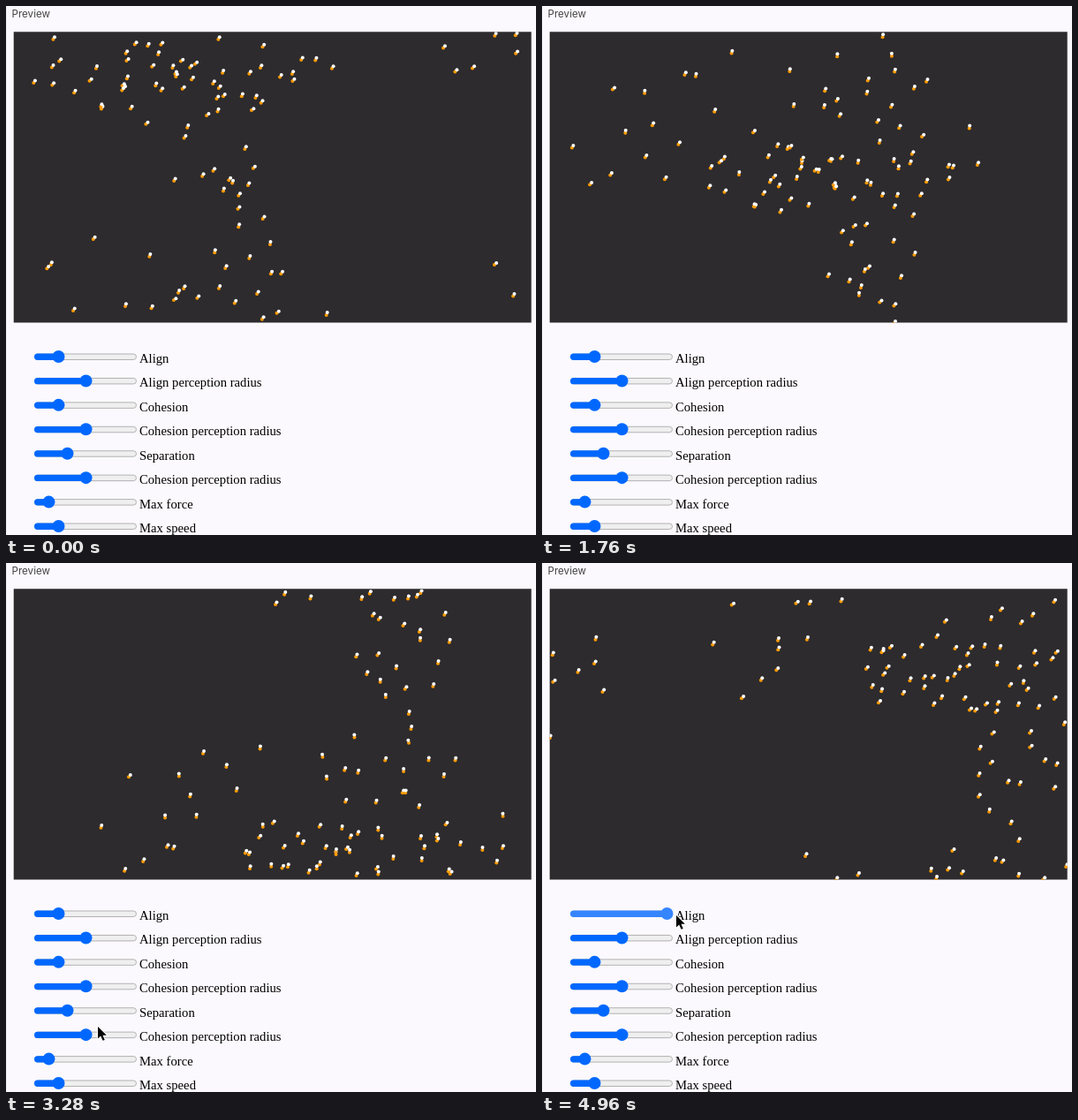
Write an HTML page with a canvas that moves like this. It is 600x599 px and loops after 5 s.

```html
<!DOCTYPE html>
<html lang="en">
<head>
<meta charset="utf-8">
<title>Flocking preview</title>
<style>
  html, body { margin: 0; width: 100%; height: 100%; overflow: hidden; background: #fbf9fd; }
  svg, canvas { position: absolute; left: 0; top: 0; }
  .title { font: 11.6px Inter, sans-serif; fill: #444; }
  .label { font: 14.68px "Liberation Serif", serif; fill: #000; }
</style>
</head>
<body>
<svg id="text" width="600" height="599">
  <rect width="1" height="599" fill="#eeecf0"/>
  <text class="title" x="6.5" y="13">Preview</text>
</svg>
<canvas id="stage" width="600" height="599"></canvas>
<script>
const LOOP = 5000, STEP = 40;
const FIELD = { x: 8.7, y: 29.2, w: 586, h: 329.2 };
const ctx = document.getElementById('stage').getContext('2d');

// Label and thumb position of each slider
const sliders = [
  ['Align', 59.5], ['Align perception radius', 90.5],
  ['Cohesion', 59.5], ['Cohesion perception radius', 90.5],
  ['Separation', 69.5], ['Cohesion perception radius', 90.5],
  ['Max force', 48.5], ['Max speed', 59.5],
].map(([label, value], i) => ({ label, value, y: 397 + i * 27.43 }));

for (const { label, y } of sliders) {
  const text = document.createElementNS('http://www.w3.org/2000/svg', 'text');
  text.setAttribute('class', 'label');
  text.setAttribute('x', 151);
  text.setAttribute('y', y + 7);
  text.textContent = label;
  document.getElementById('text').append(text);
}

let seed = 7;
const random = () => (seed = (seed * 16807) % 2147483647) / 2147483647;
const spread = r => (random() * 2 - 1) * r;
const clamp = (v, lo, hi) => Math.min(hi, Math.max(lo, v));
const wrap = (v, size) => ((v % size) + size) % size;

// The flock at ANCHOR seconds: evenly filled ellipses [x, y, rx, ry, boids]
const ANCHOR = 2.68;
const groups = [
  [320, 74, 90, 46, 30], [455, 66, 105, 42, 20], [425, 172, 55, 90, 21],
  [405, 312, 95, 38, 15], [200, 306, 90, 38, 7], [145, 56, 75, 30, 7],
];
const boids = groups.flatMap(([x, y, rx, ry, count]) => Array.from({ length: count }, (_, i) => {
  const r = Math.sqrt((i + 0.5) / count), angle = i * 2.4;
  return {
    x: x + rx * r * Math.cos(angle) + spread(9),
    y: y + ry * r * Math.sin(angle) + spread(9),
    vx: 46 + spread(9), vy: -123 + spread(7),
    sway: 9 + spread(5), rate: 3.5 + spread(1), phase: spread(Math.PI),
  };
}));

// Steady climb with a slowing drift to the right, pulled right again once aligned
function position(b, time) {
  const s = time - ANCHOR, angle = b.rate * s + b.phase;
  return {
    x: b.x + b.vx * s - 7 * s * s + b.sway * Math.sin(angle) + 60 * Math.max(0, time - 4.25),
    y: b.y + b.vy * s + b.sway * Math.cos(angle),
  };
}

function dot(x, y, r, color) {
  ctx.fillStyle = color;
  ctx.beginPath();
  ctx.arc(x, y, r, 0, Math.PI * 2);
  ctx.fill();
}

function drawFlock(time) {
  const { x, y, w, h } = FIELD;
  ctx.save();
  ctx.beginPath();
  ctx.rect(x, y, w, h);
  ctx.clip();
  ctx.fillStyle = '#2d2b2d';
  ctx.fillRect(0, 0, 600, 400);
  for (const b of boids) {
    const p = position(b, time), next = position(b, time + 0.02);
    const heading = Math.atan2(next.y - p.y, next.x - p.x);
    const dx = 1.5 * Math.cos(heading), dy = 1.5 * Math.sin(heading);
    const px = x + wrap(p.x - x, w), py = y + wrap(p.y - y, h);
    dot(px - dx, py - dy, 2, '#ff9a00');
    dot(px + dx, py + dy, 2, '#fff');
  }
  ctx.restore();
}

// Pointer path: [ms, x, y]
const path = [
  [2980, 122, 602], [3280, 104, 525], [3840, 59, 395], [4240, 59, 395], [4800, 152, 399], [LOOP, 152, 399],
];

function pointerAt(ms) {
  if (ms < path[0][0]) return null;
  const i = path.findIndex(p => ms < p[0]);
  const [t0, x0, y0] = path[i - 1], [t1, x1, y1] = path[i];
  const k = (ms - t0) / (t1 - t0), e = k * k * (3 - 2 * k);
  return { x: x0 + (x1 - x0) * e, y: y0 + (y1 - y0) * e };
}

function bar(x, y, w, h, fill, stroke) {
  ctx.beginPath();
  ctx.roundRect(x, y, w, h, h / 2);
  ctx.fillStyle = fill;
  ctx.fill();
  if (stroke) {
    ctx.strokeStyle = stroke;
    ctx.stroke();
  }
}

const looks = {
  idle: ['#0068ff', '#efefef', '#b2b2b2'],
  hover: ['#0b52c2', '#e2e2e4', '#a0a0a0'],
  active: ['#3585ff', '#f5f5f5', '#c6c6c6'],
};

function drawSlider({ value, y }, look) {
  const [blue, track, edge] = looks[look];
  bar(32.5, y - 3, 115, 6.5, track, edge);
  bar(32, y - 3.4, value - 32, 7.3, blue);
  dot(value, y, 7, blue);
}

function drawPointer({ x, y }) {
  ctx.save();
  ctx.translate(x, y);
  ctx.scale(0.93, 0.93);
  ctx.beginPath();
  [[0, 0], [0, 14.5], [3.4, 11.4], [6, 17], [8.4, 16], [5.9, 10.5], [10.6, 10.5]]
    .forEach(([px, py]) => ctx.lineTo(px, py));
  ctx.closePath();
  ctx.lineJoin = 'round';
  ctx.lineWidth = 2;
  ctx.strokeStyle = '#fff';
  ctx.stroke();
  ctx.fillStyle = '#000';
  ctx.fill();
  ctx.restore();
}

function draw(ms) {
  ctx.clearRect(0, 0, 600, 599);
  drawFlock(ms / 1000);
  const pointer = pointerAt(ms), dragging = ms >= 4240;
  sliders.forEach((slider, i) => {
    const active = dragging && i === 0;
    const hover = pointer && pointer.x < 148 && Math.abs(pointer.y - slider.y) < 8;
    const value = active ? clamp(pointer.x, 39.5, 141.5) : slider.value;
    drawSlider({ value, y: slider.y }, active ? 'active' : hover ? 'hover' : 'idle');
  });
  if (pointer) drawPointer(pointer);
}

const start = performance.now();
function tick() {
  const ms = (performance.now() - start) % LOOP;
  draw(Math.floor(ms / STEP) * STEP);
  requestAnimationFrame(tick);
}
tick();
</script>
</body>
</html>
```
